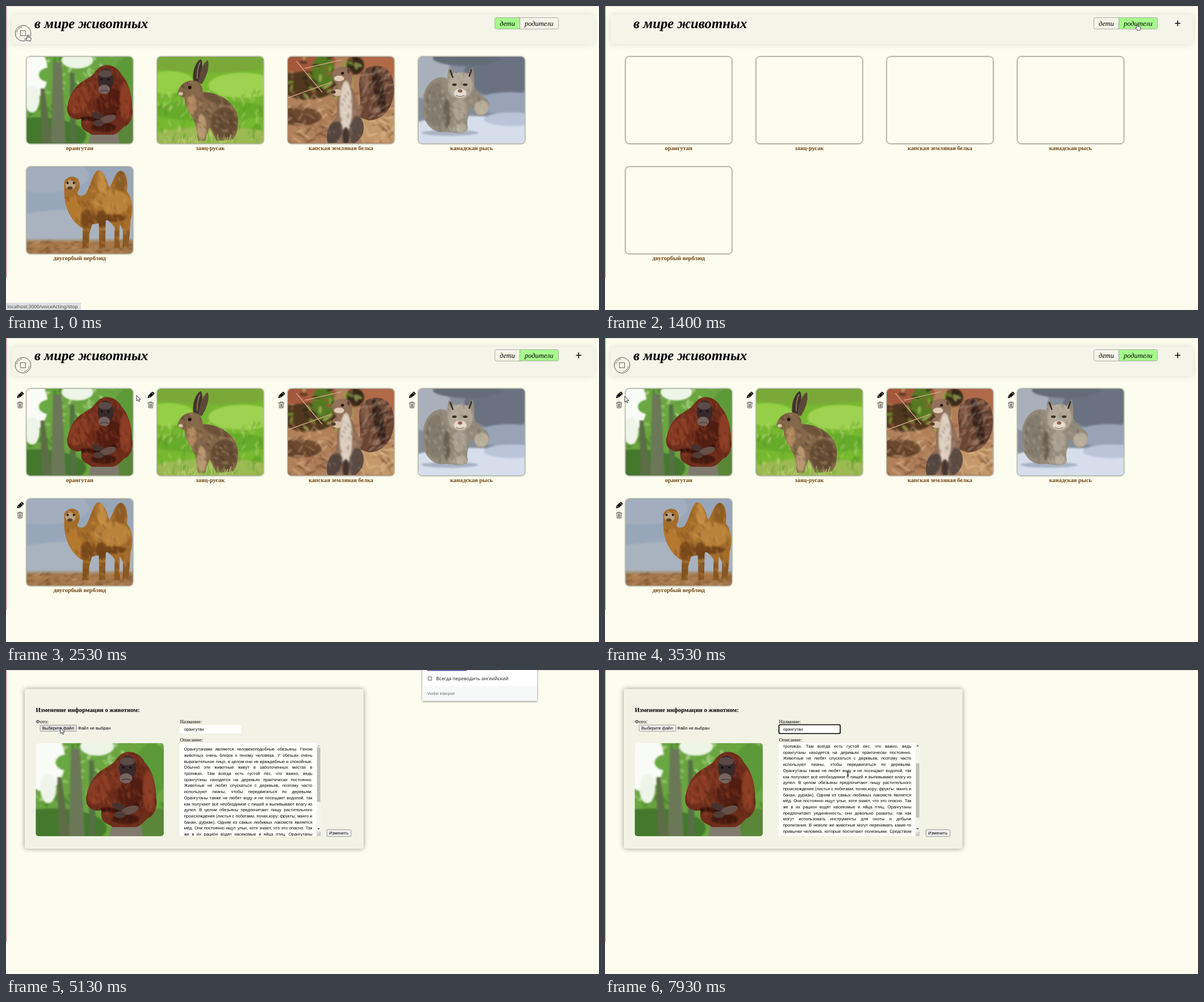
Write an HTML page that moves like this. It is 1045 by 536 pixels and loops after 8 s.

```html
<!DOCTYPE html>
<html lang="ru">
<head>
<meta charset="utf-8">
<style>
html, body { margin: 0; width: 100%; height: 100%; overflow: hidden; background: #fcfdee; }
#stage { display: block; width: 1045px; height: 536px; text-rendering: geometricPrecision; }
.serif { font-family: "Liberation Serif", serif; }
.sans { font-family: "Liberation Sans", sans-serif; font-size: 7.5px; }
.ui { font-family: "Noto Sans", "Open Sans", sans-serif; font-size: 8.3px; }
.title { font-size: 24.75px; font-weight: bold; font-style: italic; }
.tab { font-size: 12.45px; font-style: italic; }
.name { font-size: 10.4px; font-weight: bold; fill: #70400f; text-anchor: middle; }
.label { font-size: 9.1px; }
.head { font-size: 10.9px; font-weight: bold; }
.info div { width: 226px; height: 10.71px; line-height: 10.71px; white-space: nowrap; text-align: justify; text-align-last: justify; }
.soft { filter: blur(1.4px); }
.card { filter: drop-shadow(0 0 1.8px #000); }
.panel { filter: drop-shadow(0 0 4px #0006); }
.btn { fill: #efefef; stroke: #767676; stroke-width: .7; }
</style>
</head>
<body>
<svg id="stage" viewBox="0 0 1045 536"></svg>
<script>
const LOOP = 8000, PARENTS = 1130, LOADED = 1650, EDIT = 4730, FOCUS = 6900;
let seed = 7;
const rnd = () => (seed = seed * 16807 % 2147483647) / 2147483647;
const el = (x, y, rx, ry, fill, rot = 0) =>
  `<ellipse cx="${x}" cy="${y}" rx="${rx}" ry="${ry}" fill="${fill}" transform="rotate(${rot} ${x} ${y})"/>`;
const box = (x, y, w, h, fill, more = '') => `<rect x="${x}" y="${y}" width="${w}" height="${h}" fill="${fill}" ${more}/>`;
const shape = (d, fill, more = '') => `<path d="${d}" fill="${fill}" ${more}/>`;
const line = (d, color, w = 1) => shape(d, 'none', `stroke="${color}" stroke-width="${w}" stroke-linecap="round"`);
const text = (x, y, cls, s, more = '') => `<text x="${x}" y="${y}" class="${cls}" ${more}>${s}</text>`;
const group = (id, s, more = '') => `<g id="${id}" ${more}>${s}</g>`;
const soft = s => `<g class="soft">${s}</g>`;

// Scattered leaves, grass or hair inside a rectangle
function specks(n, x, y, w, h, colors, rx, ry, rot = 0, spread = 50) {
  let s = '';
  while (n--) s += el((x + rnd() * w).toFixed(1), (y + rnd() * h).toFixed(1), rx, ry,
    colors[n % colors.length], (rot + (rnd() - .5) * spread).toFixed(0));
  return `<g opacity=".6">${s}</g>`;
}
const furry = (id, d, fill, inner) =>
  `<clipPath id="${id}"><path d="${d}"/></clipPath>${shape(d, fill)}<g clip-path="url(#${id})">${soft(inner)}</g>`;

function ape() {
  return soft(box(-5, -5, 235, 175, '#6aa540') +
    specks(130, 0, 0, 225, 110, ['#9bd070', '#3f7d28', '#62a23c', '#c2e0a5'], 6, 3, 40, 180) +
    el(14, 30, 38, 55, '#f8fbf6') + el(22, 80, 14, 26, '#eef5e8') + el(108, 6, 30, 16, '#edf5e6') +
    el(205, 45, 30, 45, '#5c9a39') + el(55, 34, 20, 14, '#69a843') + el(30, 150, 95, 35, '#44792d') + el(215, 150, 30, 35, '#5a8637') +
    shape('M62 10L78 10L86 164L58 164Z', '#6b7858') + shape('M38 60L45 60L60 164L40 164Z', '#5d6e46') + shape('M94 30L102 30L106 164L94 164Z', '#567045')) +
    shape('M134 140C145 136 172 138 184 140L188 164H130Z', '#817b6f') +
    furry('apeFur', 'M150 20C165 10 185 18 192 34C204 46 212 70 212 96C216 112 208 130 196 133C188 142 184 146 176 148L136 148C126 140 112 142 116 118C100 122 86 112 89 94C92 78 100 58 116 48C128 40 138 36 142 28Z', '#6f2e1c',
      el(172, 88, 28, 28, '#521d12') + el(112, 82, 18, 28, '#8b3d25', 30) + el(199, 85, 11, 38, '#8b3d25') + el(140, 62, 14, 18, '#7c3520') +
      line('M118 118C138 114 156 126 178 110', '#351009', 8) + el(158, 134, 24, 9, '#43190f') +
      specks(190, 85, 15, 130, 130, ['#b15f36', '#3f150b', '#8d3b20', '#5c2315'], 7, .8, 75, 70)) +
    el(162, 44, 15, 22, '#38292a') + el(159, 62, 11, 9, '#776460') + el(161, 32, 13, 7, '#5b4a48') +
    el(154, 43, 2.5, 1.5, '#120c0c') + el(167, 43, 2.5, 1.5, '#120c0c') + line('M152 65Q159 62 167 65', '#2d201e') +
    el(146, 112, 12, 6, '#46332f', 20) + el(166, 118, 16, 7, '#665049', -18) + el(148, 126, 10, 6, '#503c37');
}
function hare() {
  return soft(box(-5, -5, 200, 165, '#76b82f') + el(95, 8, 120, 20, '#7aa93a') + el(20, 45, 45, 20, '#95cf47') +
    el(150, 50, 60, 22, '#a0d251') + el(95, 95, 110, 18, '#67ab2b') + el(100, 145, 115, 22, '#9db953') +
    specks(170, 0, 60, 186, 92, ['#c9e58a', '#417f1d', '#84c83d', '#dfe3a8', '#5d9b28'], 1, 6, 10, 80)) +
    shape('M64 46C60 30 66 10 76 4C82 8 78 30 74 46Z', '#3f342b') + shape('M72 46C74 26 82 8 89 6C93 20 84 40 78 48Z', '#5c4938') + line('M70 38Q70 20 75 10', '#8d735a', 2) +
    furry('hareFur', 'M36 62C40 46 54 40 66 42C76 44 80 54 80 62C100 62 126 72 138 94C146 112 142 138 132 146L104 148C100 140 96 132 92 124L84 148L70 148C72 130 66 112 56 98C50 88 48 78 48 72C42 72 36 68 36 62Z', '#86684a',
      el(118, 116, 24, 27, '#674d35') + el(78, 125, 8, 25, '#b79871') + el(60, 84, 9, 18, '#b18a60') + el(105, 74, 26, 8, '#6c5239', 20) +
      specks(180, 36, 42, 108, 106, ['#382a1e', '#c9ac80', '#604730'], 4, .8, 45)) +
    el(57, 54, 3, 3, '#1c120a') + el(41, 65, 4, 3, '#d5c4a4') + specks(40, 30, 140, 115, 12, ['#76b33b', '#c5d780'], .9, 6, 0);
}
function squirrel() {
  return soft(box(-5, -5, 200, 165, '#b0805b') + el(30, 8, 55, 20, '#a4583c') + el(165, 12, 55, 28, '#b06a48') +
    el(35, 50, 50, 25, '#50381f') + el(62, 25, 20, 30, '#557a22') + el(118, 15, 16, 16, '#38281a') + el(20, 105, 40, 16, '#6b482f') + el(165, 128, 50, 25, '#c39769') +
    specks(55, 0, 0, 125, 75, ['#86b038', '#2b2513', '#9d5b38', '#b3c766'], 7, 3, 30, 150) +
    specks(150, 0, 72, 186, 80, ['#f0d5a8', '#482817', '#d2a575', '#8a5a38'], 10, 1.1, 0, 140)) +
    line('M0 72L75 45M15 8L60 62M30 20L95 5', '#cfa180', 1.5) +
    furry('tailFur', 'M114 102C140 92 118 54 128 32C136 12 170 8 182 32C196 64 180 112 142 112Z', '#6b4534',
      el(160, 58, 9, 40, '#33211b', -12) + el(136, 50, 6, 28, '#8d6650') + specks(140, 110, 15, 75, 95, ['#dcc3ac', '#2b1a14', '#8d6048'], 8, .9, -40, 70)) +
    furry('sqFur', 'M78 28C80 18 96 14 106 20C116 28 113 44 111 52C120 68 126 90 128 108C138 120 134 142 118 152L70 152C66 138 70 120 84 108C88 92 86 78 88 66L78 62C76 54 84 50 88 48C80 44 76 36 78 28Z', '#93705a',
      el(102, 88, 11, 46, '#ded1c2') + el(79, 136, 14, 24, '#54463f', 30) + el(122, 132, 14, 28, '#5c4c43') + el(102, 140, 6, 16, '#45352e') +
      specks(80, 70, 18, 62, 132, ['#bca493', '#4a3a31'], 4, .7, 70)) +
    el(90, 38, 9, 5, '#dfccb7') + el(96, 29, 2.6, 2.4, '#17100c') + el(107, 24, 3, 5, '#62463a') + el(87, 63, 9, 6, '#d5bca5') + el(80, 62, 4, 3, '#50382e');
}
function lynx() {
  return soft(box(-5, -5, 200, 165, '#858d9b') + el(15, 25, 40, 50, '#a9b0bb') + el(145, 28, 65, 42, '#6a7282') + el(85, 2, 60, 14, '#646c79') +
    el(160, 82, 60, 20, '#98a3b8') + el(90, 148, 140, 44, '#d6deec') + el(165, 110, 50, 12, '#bac5da') + el(55, 134, 50, 5, '#a7b1c4')) +
    furry('lynxFur', 'M8 72C12 44 34 30 50 38L53 20L66 29C74 25 82 26 86 30L95 18C99 28 98 42 98 52C104 62 112 70 120 74C130 88 122 104 106 104C100 102 96 90 92 84C90 100 84 112 86 122C90 132 78 136 66 134L48 132C30 136 14 124 8 102Z', '#948b7c',
      el(30, 84, 20, 38, '#847c6e') + el(73, 50, 22, 25, '#b3aa9a') + el(111, 90, 13, 13, '#b9ae9c') + el(72, 92, 13, 18, '#aaa193') + el(50, 100, 6, 26, '#696254') +
      el(74, 126, 14, 8, '#b7ae9e') + specks(190, 5, 25, 120, 110, ['#5f584e', '#d9d3c6', '#8a806f'], 4, .8, 65)) +
    el(63, 49, 4, 2.2, '#3b3122') + el(82, 49, 4, 2.2, '#3b3122') + el(73, 64, 11, 8, '#e2ddd2') + el(73, 60, 4, 3, '#99604f') + line('M66 68Q73 72 80 68', '#595148') +
    line('M56 24L60 36M93 23L89 34', '#2d2a27', 2.5);
}
function camel() {
  return soft(box(-5, -5, 200, 165, '#98a6b9') + el(95, 108, 150, 34, '#a9b2bf') + el(30, 15, 80, 30, '#a2aebd') + box(-5, 127, 200, 4, '#a3977f') +
    box(-5, 131, 200, 30, '#a2754a') + specks(120, 0, 131, 186, 21, ['#cba06c', '#66421f', '#b5834e'], 6, .9, -10, 60)) +
    furry('camelFur', 'M66 27C68 18 82 13 90 21C95 28 94 39 89 45C90 51 96 52 103 48C111 39 115 14 123 7C134 1 141 22 145 36C151 32 154 10 164 7C176 4 179 29 176 43C188 55 187 82 183 93L181 119L179 143H169L170 112L164 101L163 123L164 143H154L155 106C146 96 142 91 139 95L138 142H128L127 99L115 101L110 118L109 143H98L99 108C80 98 66 72 66 44Z', '#a56d2a',
      el(84, 78, 14, 26, '#b5782f', -20) + el(108, 92, 14, 18, '#7c4a1a') + el(133, 24, 9, 22, '#c28b42') + el(165, 28, 9, 23, '#8d5c26') + el(150, 62, 34, 22, '#b9823a') + el(132, 92, 10, 16, '#70431a') +
      box(95, 112, 92, 32, '#8a5822') + el(148, 90, 26, 7, '#744519') +
      specks(210, 64, 6, 122, 138, ['#d9a95f', '#5e3814', '#97642a'], 5, .8, 65, 70)) +
    el(77, 32, 9, 8, '#b9a183') + el(72, 28, 2, 2, '#21170f') + el(83, 28, 2, 2, '#21170f') + el(76, 37, 5, 3, '#5b412c');
}

const cards = [['орангутан', 36.6, 89.7], ['заяц-русак', 266.8, 89.7, hare], ['капская земляная белка', 497, 89.7, squirrel],
  ['канадская рысь', 727.2, 89.7, lynx], ['двугорбый верблюд', 36.6, 284, camel]];
const photo = ([, x, y, draw]) => `<g transform="translate(${x} ${y})" clip-path="url(#cardClip)">` +
  (draw ? draw() : '<use href="#ape" transform="translate(-11 0) scale(.927)"/>') + '</g>';
const tools = ([, x, y]) => `<g transform="translate(${x - 17.8} ${y + 4.2})">` +
  shape('M.5 12L1.5 7.5L8 1.2Q9 .3 10 1.2L12.2 3.4Q13 4.4 12 5.4L5.5 11.2Z', '#111') + line('M2.5 8L5 10.5M7.7 2.5L10.7 5.5', '#fcfdee', .8) +
  line('M1 20.5H11M4 20V18.8H8V20M2 21L2.6 29.3H9.4L10 21M4.5 22.5V27.8M6 22.5V27.8M7.5 22.5V27.8', '#333', .8) + '</g>';

const lines = `Орангутанами являются человекоподобные обезьяны. Геном
животных очень близок к геному человека. У обезьян очень
выразительное лицо, в целом они не враждебные и спокойные.
Обычно эти животные живут в заболоченных местах в
тропиках. Там всегда есть густой лес, что важно, ведь
орангутаны находятся на деревьях практически постоянно.
Животные не любят спускаться с деревьев, поэтому часто
используют лианы, чтобы передвигаться по деревьям.
Орангутаны также не любят воду и не посещают водопой, так
как получают всё необходимое с пищей и выпивывают влагу из
дупел. В целом обезьяны предпочитают пищу растительного
происхождения (листья с побегами, почки,кору; фрукты: манго и
банан, дуриан). Одним из самых любимых лакомств является
мёд. Они постоянно ищут ульи, хотя знают, что это опасно. Так
же в их рацион водят насекомые и яйца птиц. Орангутаны
предпочитают уединённость, они довольно развиты, так как
могут использовать инструменты для охоты и добычи
пропитания. В неволе же животные могут перенимать какие-то
привычки человека, которые посчитают полезными. Средством`.split('\n');

const listPage = box(10, 15.5, 1026, 51.5, '#f4f4e8', 'rx="5" style="filter:drop-shadow(0 0 6px #0002)"') +
  text(50, 38.5, 'serif title', 'в мире животных') +
  shape('M864.5 20.5H905.5V40.5H864.5Q861.5 40.5 861.5 37.5V23.5Q861.5 20.5 864.5 20.5Z', '#f4f4e8', 'id="kidsTab" stroke="#999" stroke-width=".8"') +
  shape('M905.5 20.5H970.5Q973.5 20.5 973.5 23.5V37.5Q973.5 40.5 970.5 40.5H905.5Z', '#f4f4e8', 'id="parentsTab" stroke="#999" stroke-width=".8"') +
  text(870, 34.5, 'serif tab', 'дети') + text(914, 34.5, 'serif tab', 'родители') +
  group('plus', line('M1005 30.5H1013.5M1009.2 26V35', '#000', 1.5)) +
  group('stop', '<circle cx="30" cy="48" r="13.8" fill="none" stroke="#444" stroke-width=".9"/>' + box(25.5, 43.5, 9, 9, 'none', 'stroke="#444" stroke-width=".8"') +
    line('M19 46A11.2 11.2 0 0 1 28 37M41 50A11.2 11.2 0 0 1 32 59', '#555', .8)) +
  cards.map(([s, x, y]) => box(x, y, 186.6, 152.5, '#fcfdee', 'rx="6" class="card"') + text(x + 93.2, y + 164.2, 'serif name', s)).join('') +
  group('photos', cards.map(photo).join('')) + group('tools', cards.map(tools).join(''));

const editPage = box(33, 33.5, 597, 281.5, '#f2f2e5', 'rx="4" class="panel"') +
  text(52.5, 73.5, 'serif head', 'Изменение информации о животном:') +
  text(52.5, 94, 'serif label', 'Фото:') + text(306.5, 94, 'serif label', 'Название:') + text(306.5, 125.7, 'serif label', 'Описание:') +
  box(60, 97, 64.5, 11, '#efefef', 'rx="1.5" class="btn" id="choose"') + text(64, 105.2, 'sans', 'Выберите файл') + text(127, 105.2, 'sans', 'Файл не выбран') +
  '<g transform="translate(52.5 129)" clip-path="url(#bigClip)"><use href="#ape"/></g>' +
  box(306, 97, 108.5, 15, '#fffffd', 'rx="1"') + box(306.5, 96.5, 108, 15.5, 'none', 'id="ring" rx="2" stroke="#000" stroke-width="1.7"') +
  text(314, 107.4, 'sans', 'орангутан') +
  box(306, 128.5, 249, 164.5, '#fffffd', 'rx="2"') + box(547, 128.5, 8, 156.5, '#f4f4f0') + box(547, 285, 8, 8, '#dcdcd8') +
  line('M549.5 291.5L553.5 287.5M552 291.5L553.5 290', '#888', .7) +
  shape('M548.8 134.5L551 132L553.2 134.5Z', '#555', 'id="up"') + shape('M548.8 279L551 281.5L553.2 279Z', '#444') + box(548, 136.5, 6, 96, '#c1c1bd', 'id="thumb"') +
  '<foreignObject x="313.8" y="128.5" width="232" height="164.5"><div class="sans info" style="height:164.5px;overflow:hidden"><section id="info" style="padding-top:6.7px">' +
  lines.map(s => `<div>${s}</div>`).join('') + '</section></div></foreignObject>' +
  box(565.5, 281.5, 42.5, 12, '#efefef', 'rx="1.5" class="btn"') + text(569.5, 290.3, 'sans', 'Изменить') +
  group('popup', box(733.5, -8, 202.5, 62.5, '#fff', 'style="filter:drop-shadow(0 1px 1.5px #0009)"') + box(733.5, 28, 202.5, 26.5, '#f7f8f8') +
    box(742, 0, 70, 1.6, '#555b99') + box(812, .5, 55, .7, '#ccc') + box(744, 12, 6, 6, '#fff', 'stroke="#555" stroke-width=".9"') +
    text(758, 18, 'ui', 'Всегда переводить английский', 'fill="#222"') +
    text(742.5, 44.2, '', 'Vorlim Interpret', 'fill="#666" font-family="Roboto, sans-serif" font-size="7"'));

const pointers = {
  arrow: shape('M0 0V10L2.4 7.9L4 11.4L5.6 10.7L4.1 7.3H7.2Z', '#fff', 'stroke="#111" stroke-width=".8"'),
  hand: shape('M0 1Q1 -1 2 1V4.2Q3 3.3 3.8 4.4Q4.8 3.6 5.5 4.7Q7 4.2 7 6V8L6 10.5H.6L-2 7Q-2.4 5.4 0 6.3Z', '#fff', 'stroke="#111" stroke-width=".8"'),
  beam: line('M-1.8 -4Q0 -4 0 -3V3Q0 4 -1.8 4M1.8 -4Q0 -4 0 -3M0 3Q0 4 1.8 4M-1 1H1', '#111', 1.1)
};
document.getElementById('stage').innerHTML =
  `<defs>${group('ape', ape())}<clipPath id="cardClip">${box(0, 0, 186.6, 152.5, '#000', 'rx="6"')}</clipPath>
  <clipPath id="bigClip">${box(0, 0, 225.5, 164, '#000', 'rx="5"')}</clipPath></defs>` +
  box(0, 0, 1045, 536, '#fcfdee') + box(0, 0, 1045, .8, '#d6d6cc') + box(0, 0, .9, 479, '#c4665a') +
  group('list', listPage) + group('edit', editPage) +
  group('status', box(0, 523, 132, 13, '#dee0e3', 'id="statusBox"') + text(2.5, 532.6, 'ui', '', 'id="url" fill="#444"')) +
  Object.entries(pointers).map(([id, s]) => group(id, s)).join('');

const $ = id => document.getElementById(id);
const show = (id, on) => $(id).style.display = on ? '' : 'none';
const clamp = v => Math.max(0, Math.min(1, v));

// time, x, y
const path = [[0, 37, 51], [70, 37, 51], [870, 942, 30], [1130, 937, 32], [1800, 937, 32], [2480, 230, 101], [2750, 230, 101],
  [3650, 25, 103], [5000, 25, 103], [5130, 96, 102], [6100, 96, 102], [6550, 500, 77], [6850, 367, 105], [7130, 367, 105], [7400, 428, 183], [LOOP, 428, 183]];
function place(t) {
  const i = path.findIndex(p => p[0] > t), [a, x, y] = path[i - 1], [b, u, v] = path[i];
  const k = (t - a) / (b - a), e = k * k * (3 - 2 * k);
  return [x + (u - x) * e, y + (v - y) * e];
}
function pointerAt(t, x, y) {
  if (t < EDIT) return t < 150 || (x > 861 && x < 974 && y < 41) ? 'hand' : 'arrow';
  const inField = x > 306 && x < 414 && y > 97 && y < 112, inInfo = x > 306 && x < 546 && y > 129;
  return inField || inInfo ? 'beam' : 'arrow';
}

function render(t) {
  const parents = t >= PARENTS, loaded = t < PARENTS || t >= LOADED;
  show('list', t < EDIT);
  show('edit', t >= EDIT);
  show('photos', loaded);
  show('stop', loaded);
  show('tools', t >= LOADED);
  show('plus', parents);
  $('kidsTab').setAttribute('fill', parents ? '#f4f4e8' : '#a7fb8d');
  $('parentsTab').setAttribute('fill', parents ? '#a7fb8d' : '#f4f4e8');

  const opening = t > 3600;
  show('status', t < 210 || (opening && t < EDIT));
  $('statusBox').setAttribute('width', opening ? 204 : 132);
  $('url').textContent = 'localhost:3000/' + (opening ? 'animal/6082b5591f1ab6386ab7cb75' : 'voiceActing/stop');

  show('popup', t >= 4870 && t < 6040);
  show('ring', t >= FOCUS);
  const [x, y] = place(t), scroll = clamp((t - 7430) / 480);
  $('choose').style.fill = x > 60 && x < 124 && y > 97 && y < 108 ? '#e0e0e0' : '#efefef';
  $('info').style.marginTop = -48 * scroll + 'px';
  $('thumb').setAttribute('y', 136.5 + 28 * scroll);
  $('up').setAttribute('fill', scroll ? '#444' : '#aaa');

  const kind = pointerAt(t, x, y);
  for (const id in pointers) show(id, id === kind);
  $(kind).setAttribute('transform', `translate(${x} ${y})`);
}

const start = performance.now();
function frame() {
  render((performance.now() - start) % LOOP);
  requestAnimationFrame(frame);
}
frame();
</script>
</body>
</html>
```
